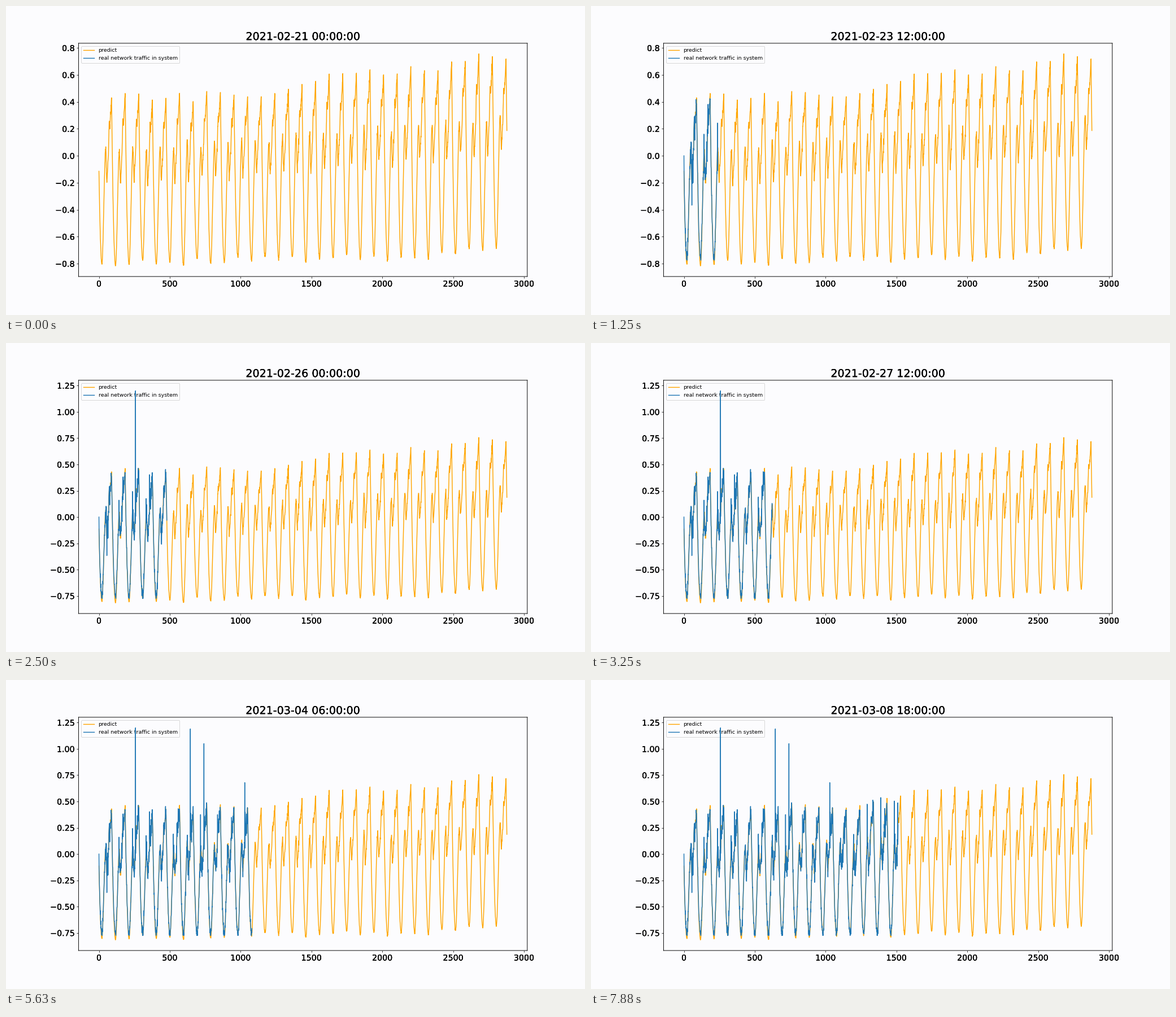
Animation, 1025 px wide and 547 px high, one loop 8000 ms. Source, as a matplotlib script:

```python
import numpy as np
import matplotlib.pyplot as plt
from matplotlib.animation import FuncAnimation
from matplotlib.patheffects import Normal

W, H, DPI = 1025, 547, 64
K = 0.949 * 72 / DPI          # page scale: 1080 px wide layout shrunk to 1025
DAY, DAYS, STEP = 96, 30, 24
FRAMES, INTERVAL = 64, 125
BG = "#fcfcfe"
BOTTOM, TOP, SURGE = -.817, .756, 1.2

sizes = {
    "font.size": 15, "axes.titlesize": 20.1, "legend.fontsize": 10,
    "lines.linewidth": 1.5, "axes.linewidth": 1, "axes.titlepad": 6,
    "patch.linewidth": 1,
}
for axis in ("xtick", "ytick"):
    sizes.update({f"{axis}.major.size": 3.5, f"{axis}.major.pad": 3.5,
                  f"{axis}.major.width": 0.8})
plt.rcParams.update({key: v * K for key, v in sizes.items()})
plt.rcParams["font.family"] = "DejaVu Sans"

rng = np.random.default_rng(7)
n = DAY * DAYS
x = np.arange(n)
# each cycle runs from one evening peak (t = -7) to the next (t = 89)
day, t = np.divmod(x + 7, DAY)
t = t - 7
busy = (t > 42) & (t < 88)


def trend(days, values, spread):
    """Slow drift through a few key days, with a small daily variation."""
    d = np.arange(DAYS + 1)
    return np.interp(d, days, values) + rng.uniform(-spread, spread, d.size)


def ease(start, end):
    u = np.clip((t - start) / (end - start), 0, 1)
    return u * u * (3 - 2 * u)


def daily_curve(peak, low, noon, dip):
    """Fall to the night low, noon bump, dip, climb to the evening peak."""
    before = peak[np.maximum(day - 1, 0)]
    peak, low, noon, dip = (v[day] for v in (peak, low, noon, dip))
    fall = low + (before - low) * ((21 - t) / 28) ** 2
    rise = low + (noon - low) * ease(21, 48)
    sag = noon + (dip - noon) * ease(48, 56)
    shoulder = .2 * np.exp(-((t - 72) / 3) ** 2)
    climb = dip + (peak - dip) * ((t - 56) / 33 + shoulder)
    return np.select([t < 21, t < 48, t < 56], [fall, rise, sag], climb)


def rough(quiet, loud):
    return rng.normal(size=n) * np.where(busy, loud, quiet)


peak = trend([0, 11, 18, 27], [.43, .46, .60, .72], .04)
low = trend([0, 12, 25, 29], [-.785, -.775, -.735, -.69], .03)
noon = trend([0, 11, 29], [.05, .10, .28], .03)
dip = trend([0, 11, 29], [-.20, -.145, .02], .03)
forecast = np.clip(daily_curve(peak, low, noon, dip) + rough(.006, .014),
                   BOTTOM, TOP)

# measured traffic follows the forecast, with two scheduled bursts a day
night = np.full(DAYS + 1, -.76)
real_peak = peak + rng.uniform(-.05, .03, peak.size)
real = daily_curve(real_peak, night, noon - .05, dip) + rough(.025, .06)
real = np.clip(real, -.775, real_peak[day])
for hour in (45, 69):
    at = np.arange(hour, n, DAY)
    real[at] += rng.exponential(.16, at.size)
real[0] = 0
real[[258, 645, 741]] = SURGE, 1.19, 1.05

fig = plt.figure(figsize=(W / DPI, H / DPI), dpi=DPI, facecolor=BG)
ax = fig.add_axes([.1253, .1245, .775, .755], facecolor=BG)
ax.plot(x, forecast, color="orange", label="predict")
line, = ax.plot([], [], color="#1f77b4", label="real network traffic in system")
ax.set_xlim(-.05 * (n - 1), 1.05 * (n - 1))
ax.set_xticks(range(0, 3001, 500))
ax.legend(loc="upper left", facecolor=BG).set_zorder(1)
for spine in ax.spines.values():
    spine.set_snap(False)

HEAVY = [Normal()] * 3
title = ax.set_title("", path_effects=HEAVY)
start = np.datetime64("2021-02-21T00")


def fit_y(top, ticks):
    pad = .05 * (top - BOTTOM)
    ax.set_ylim(BOTTOM - pad, top + pad)
    ax.set_yticks(ticks)


def update(i):
    count = i * STEP
    line.set_data(x[:count], real[:count])
    if SURGE in real[:count]:
        fit_y(SURGE, np.arange(-3, 6) / 4)
    else:
        fit_y(TOP, np.arange(-4, 5) / 5)
    for label in ax.get_xticklabels() + ax.get_yticklabels():
        label.set_path_effects(HEAVY)
    now = start + np.timedelta64(6 * i, "h")
    title.set_text(str(now).replace("T", " ") + ":00:00")
    return line, title


anim = FuncAnimation(fig, update, frames=FRAMES, interval=INTERVAL,
                     init_func=lambda: update(0), repeat=True, repeat_delay=0)
plt.show()
```
